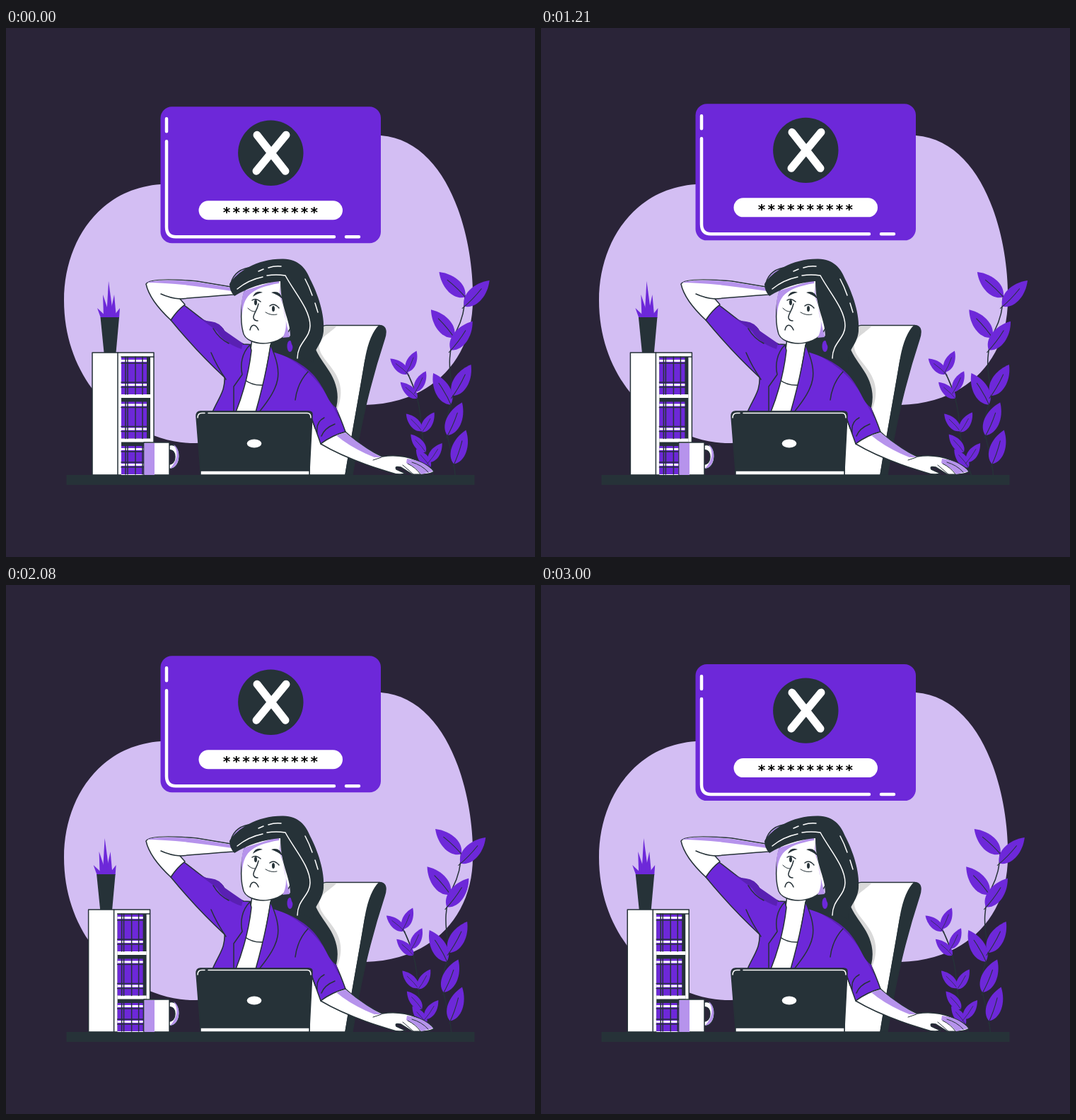
An HTML page that plays this animation: 748 by 748 pixels, repeating every 3.04 s.

```html
<!DOCTYPE html>
<html lang="en">
<head>
<meta charset="utf-8">
<title>Forgotten password</title>
<style>
  html, body { margin: 0; width: 100%; height: 100%; overflow: hidden; background: #2a2438; }
  svg { display: block; width: 100vw; height: 100vh; }
  .ink { fill: #263238; }
  .white { fill: #fff; }
  .violet { fill: #6d28d9; }
  .deep { fill: #5920b3; }
  .lilac { fill: #b693ec; }
  .line { stroke: #263238; stroke-width: 1.5; stroke-linejoin: round; stroke-linecap: round; }
  .thin { stroke-width: 1; }
  .open { fill: none; }
  .shine { fill: none; stroke: #fff; stroke-width: 1.5; stroke-linecap: round; }
  .bold { stroke-width: 4.5; }
  .cross { stroke-width: 11; }
  text { font: bold 20px "DejaVu Sans Mono", monospace; letter-spacing: 1.71px; }
</style>
</head>
<body>
<svg viewBox="0 0 748 748">
  <defs>
    <g id="leaf">
      <path class="violet" d="M0 0C-14 -8 -14 -32 0 -50C14 -32 14 -8 0 0Z"/>
      <path class="line thin open" d="M0 4Q2 -15 0 -34"/>
    </g>
  </defs>

  <path fill="#d3bef3" d="M219 221C131 227 82 303 82 385C82 510 180 588 268 587C350 586 430 535 508 533C600 531 660 470 660 385C662 300 628 160 530 152Z"/>

  <g id="sway">
    <g id="grass" class="violet"></g>
    <path class="ink" d="M133.500 409H160L155.500 459H138.500Z"/>
    <rect class="white line" x="122" y="459" width="87" height="173"/>
    <rect class="ink" x="163" y="465" width="41" height="166"/>
    <path class="line open" d="M158 459V632M163 465H209"/>
    <g id="books"></g>
    <g id="plants"></g>
  </g>

  <g id="card">
    <rect class="violet" x="218.500" width="311.500" height="193" rx="16"/>
    <path class="shine bold" d="M227 17V35M227 49V170Q227 184 240 184H464M481 184H499"/>
    <circle class="ink" cx="374.300" cy="65.500" r="46.200"/>
    <path class="shine cross" d="M355 40L395 91M396 40L354 91"/>
    <rect class="white" x="272.500" y="133" width="203.500" height="27" rx="13.500"/>
    <text x="306" y="156">**********</text>
  </g>

  <g id="chair">
    <path class="white line" d="M436 445Q442 420 453 420.500H528L508 470L480 632H429V470Z"/>
    <path fill="#d9d9d9" d="M447 422H467C458 432 442 437 443 452C446 475 488 490 468 540L436 448Z"/>
    <path class="ink line" d="M528 420.500C539 421 538 431 535 440C517 495 503 550 490 632H480C489 575 500 520 508 470Q514 434 528 420.500Z"/>
  </g>

  <g id="jacket">
    <path class="violet line" d="M252 392Q242 399 233 413Q270 458 309 494C310 514 300 524 292 543L430 546L445 588Q461 576 480 571C462 520 440 475 372 449L336 447Q312 437 307 426C300 416 287 419 278 412Z"/>
    <path class="deep" d="M263 402Q275 414 290 415Q302 416 309 428L335 446L333 454Q307 445 299 429ZM386 459Q455 475 471 552C450 510 438 487 386 459Z"/>
    <path class="ink" d="M374 440L435 430C430 465 463 478 468 513Q470 524 467 537C446 525 455 480 374 457Z"/>
    <path class="line open" d="M290 459Q298 478 311 497M293 425Q301 439 315 446M427 486Q412 502 409 526M430 546L437 566M450 551Q438 557 440 572M465 560Q450 566 446 577"/>
    <path class="white line" d="M348 440H376L365 500L354 543H324Q341 495 348 440Z"/>
    <path class="line open" d="M337 497Q348 506 364 505"/>
    <path class="violet line" d="M345 448C333 460 331 477 334 490L322 507V543H325Q342 500 347 456Z"/>
    <path class="violet line" d="M374 448C392 490 388 505 358 543H353Q368 490 374 448Z"/>
  </g>

  <g id="raisedArm">
    <path class="lilac line" d="M318 361Q323 340 350 338L328 368Z"/>
    <path class="white line" d="M198 362C202 354 235 355 270 358L318 366L322 377Q280 380 246 383L253 391Q242 399 233 413Q203 385 198 362Z"/>
    <path class="lilac" d="M200 360C207 356 240 356 270 359L318 367L320 372Q240 360 200 360Z"/>
    <path class="line open" d="M246 383Q232 382 219 376"/>
  </g>

  <g id="head">
    <path class="white line" d="M339 367C332 387 331 414 335 429C338 454 405 454 405 410L390 354Z"/>
    <path class="lilac" d="M326 375L386 356V361C345 368 335 380 334 407Q331 385 337 371ZM387 360Q387 378 401 437L391 438C402 419 392 398 387 377Z"/>
    <path class="ink" d="M349 380Q353 370 363 374Q356 375 349 380ZM375 374Q387 370 391 383Q384 377 375 374Z"/>
    <path class="line open" d="M348 385Q353 381 360 387M373 393Q379 388 386 396M357 390C355 400 349 405 350 410Q351 414 356 414M345 427C347 418 353 418 357 427"/>
    <path class="line thin open" d="M342 396Q346 401 352 401M367 402Q375 407 383 405"/>
    <ellipse class="ink" cx="353" cy="388" rx="2" ry="4"/>
    <ellipse class="ink" cx="378" cy="397" rx="2" ry="4"/>
    <ellipse class="violet" cx="401.500" cy="450" rx="4" ry="8"/>
    <path class="ink" d="M316 362C326 345 355 326 392 326.500C414 327 424 340 430 355C441 376 451 405 449 429C447 449 432 456 435 473Q402 460 402 436C402 411 388 397 388 358Q352 361 323 379Q316 372 316 362Z"/>
    <path class="shine" d="M327 369Q343 356 363 352M369 350Q382 348 395 350M357 344L364 341M371 339Q380 336 389 337M395 350C408 374 430 398 430 421C430 439 412 445 412 467M423 355Q429 366 433 378M437 389L441 402"/>
  </g>

  <g id="restingArm">
    <path class="white line" d="M480 571Q505 594 532 606Q557 602 580 611Q600 619 605 627Q600 632 574 631L558 621Q549 619 552 624L565 630Q555 633 542 628L523 622Q475 606 445 588Q461 576 480 571Z"/>
    <path class="lilac" d="M480 572Q506 594 531 607H521Q488 594 467 576ZM567 609Q592 612 604 627L587 631Q580 621 566 615Z"/>
    <path class="line thin open" d="M574 614Q588 618 597 628M568 616Q580 622 586 631M561 618L576 631M531 607L519 611"/>
  </g>

  <g id="laptop">
    <rect class="white line" x="275" y="620" width="154" height="12"/>
    <path class="ink line" d="M275 542H428Q434 542 433 548L429 626H275L269 549Q269 542 275 542Z"/>
    <path class="shine" d="M271 551Q271 544.500 277 544.500H281M286 544.500H426Q431 544.500 431 551"/>
    <ellipse class="white" cx="351" cy="587.500" rx="10.300" ry="6"/>
  </g>

  <g id="mug">
    <path class="white line" d="M230 590C250 584 250 626 230 623V617C242 618 242 594 230 597Z"/>
    <path class="lilac" d="M237 589C249 596 246 622 232 623Q248 605 237 589Z"/>
    <rect class="white line" x="195" y="586" width="36" height="46"/>
    <rect class="lilac" x="195.500" y="587" width="14.500" height="45"/>
  </g>

  <rect class="ink" x="85.500" y="632" width="577" height="14"/>
</svg>

<script>
const $ = id => document.getElementById(id);
const add = (id, markup) => $(id).insertAdjacentHTML('beforeend', markup);

// Blades fan out and get shorter towards the sides
for (let i = -2; i <= 2; i++) {
  const foot = 147 + 4 * i;
  add('grass', `<path d="M${foot - 5} 410L${145 + 8 * i} ${358 + 19 * Math.abs(i)}L${foot + 5} 410Z"/>`);
}

// Three equal shelves, the lowest cut off by the table
for (let row = 0; row < 3; row++) {
  const top = 465 + 62.5 * row, bottom = Math.min(top + 53, 631);
  add('books', `
    <path class="violet" d="M163 ${top + 1}H199V${bottom}H163Z"/>
    <path class="white" d="M163 ${top + 4}h36v3h-36ZM163 ${bottom - 15}h36v3h-36ZM163 ${bottom}h41v5h-41Z"/>
    <path class="line open" d="M163 ${top + 9}h36M163 ${bottom - 17}h36M163 ${bottom - 10}h36"/>`);
  for (const x of [169, 172, 183, 193]) add('books', `<path class="line" d="M${x} ${top}V${bottom}"/>`);
}

// Leaves sit at fractions of the stem and spread wider towards its top
function plant(stem, size, lean, left, right) {
  add('plants', `<path class="line open" d="${stem}"/>`);
  const path = $('plants').lastElementChild, length = path.getTotalLength();
  const grow = side => at => {
    const { x, y } = path.getPointAtLength(at * length);
    add('plants', `<use href="#leaf" transform="translate(${x} ${y}) rotate(${side * lean(at, side)}) scale(${size / 50})"/>`);
  };
  left.forEach(grow(-1));
  right.forEach(grow(1));
}
plant('M635 632C633 600 621 580 623 558C624 536 637 524 630 502C626 478 625 456 637 428Q649 405 649 378',
  51, at => 18 + 28 * at, [.39, .76, .99], [.06, .22, .44, .69, .94]);
plant('M604 632C592 600 589 585 587 560Q585 517 562 478',
  33, (at, side) => 37 - 13 * at * side, [.07, .21, .4, .69, .92], [.12, .39, .75, .94]);

const UNIT = 1.496, FRAMES = 73, LOOP = 3040, LEAD = 1.35;

// Swings double up to 4 units, then fade the same way
function swing(k) {
  const size = Math.min(4, Math.floor(2 ** (Math.min(k, 10 - k) - 1)));
  return k % 2 ? -size : size;
}

function draw(now) {
  const frame = Math.floor((now % LOOP + 5) * 24 / 1000);
  const phase = (frame + LEAD) / FRAMES % 1;
  const k = Math.floor(phase * 10), part = phase * 10 - k;
  const x = UNIT * (swing(k) * (1 - part) + swing(k + 1) * part);
  const rise = 1 - Math.abs(1 - phase * 4 % 2);
  $('sway').setAttribute('transform', `translate(${x + .3} 0)`);
  $('card').setAttribute('transform', `translate(0 ${112.4 - 10 * UNIT * rise})`);
}

const start = performance.now();
(function tick() {
  draw(performance.now() - start);
  requestAnimationFrame(tick);
})();
</script>
</body>
</html>
```
